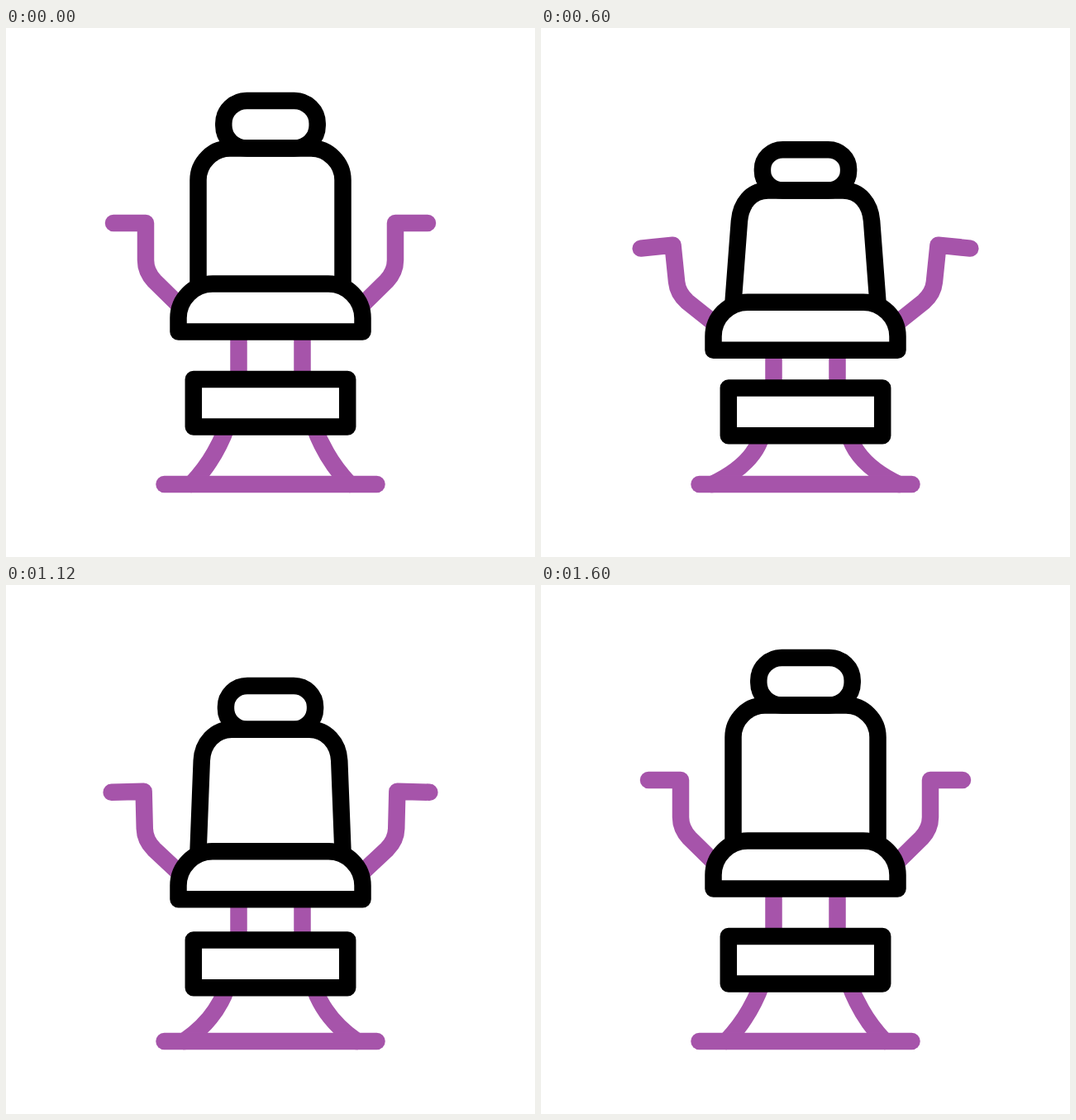
Animation of 640 by 640 pixels, one loop 1.8 s. Source, as an HTML page:

```html
<!DOCTYPE html>
<html lang="en">
<head>
<meta charset="utf-8">
<title>Barber chair</title>
<style>
  html, body { margin: 0; width: 100%; height: 100%; overflow: hidden; background: #fff; }
  svg { display: block; width: 100vw; height: 100vh; }
  svg * { stroke-width: 20.5; stroke-linecap: round; stroke-linejoin: round; }
  .accent { stroke: #a654aa; fill: none; }
  .body { stroke: #000; fill: #fff; }
</style>
</head>
<body>
<svg viewBox="0 0 640 640">
  <g class="accent">
    <g id="half">
      <path id="arm" d="M130 236H169V281C169 291 173 299 179.5 306L209 335"/>
      <path id="pole"/>
      <path id="leg"/>
    </g>
    <use href="#half" transform="matrix(-1 0 0 1 640 0)"/>
    <path d="M191.5 552H448.5"/>
  </g>
  <g class="body">
    <rect id="head"/>
    <path id="back" fill="none"/>
    <path id="seat" d="M208.5 367.5V351A41.5 41.5 0 0 1 250 309.5H390A41.5 41.5 0 0 1 431.5 351V367.5Z"/>
    <rect id="box" x="226.8" y="425" width="186.4" height="57.6"/>
  </g>
</svg>
<script>
const LOOP = 1800, STEP = 40;
const SINK = [[160, 0], [765, 1], [840, 1], [1400, 0]];
const SWING = [[145, 0], [440, 12.4], [840, -6.2], [1260, 4.1], [1600, 0]];

const $ = id => document.getElementById(id);
const set = (id, attrs) => {
  for (const name in attrs) $(id).setAttribute(name, attrs[name]);
};

const smooth = u => u * u * (3 - 2 * u);

// cubic-bezier(.5, 0, .5, 1)
function strong(x) {
  let lo = 0, hi = 1;
  for (let i = 0; i < 24; i++) {
    const u = (lo + hi) / 2;
    if (1.5 * u * (1 - u) + u ** 3 < x) lo = u; else hi = u;
  }
  return smooth((lo + hi) / 2);
}

function track(keys, t, ease) {
  if (t <= keys[0][0]) return keys[0][1];
  for (let i = 1; i < keys.length; i++) {
    const [t0, a] = keys[i - 1], [t1, b] = keys[i];
    if (t < t1) return a + (b - a) * ease((t - t0) / (t1 - t0));
  }
  return keys[keys.length - 1][1];
}

function draw(t) {
  const p = track(SINK, t, strong);
  const q = p ** 1.5;
  const angle = track(SWING, t, smooth);
  const seatY = 25.5 * p, boxY = 13 * q;

  set('seat', { transform: `translate(0 ${seatY})` });
  set('box', { transform: `translate(0 ${boxY})` });
  set('arm', { transform: `translate(0 ${seatY}) rotate(${-angle} 207.5 331)` });
  set('pole', { d: `M281.5 ${367.5 + seatY}V${425 + boxY}` });
  set('leg', {
    d: `M267 ${483 + boxY}Q${252 + 5 * q} ${523 + 7 * q} ${224 - 10 * (p + q)} 552`
  });
  set('head', {
    x: 263.3 + 5.3 * p, y: 88 + 68 * p,
    width: 113.4 - 10.6 * p, height: 57.6 - 9.5 * p,
    rx: 28 - 4 * p, ry: 27.5 - 4.5 * p
  });

  const side = 232.5 + 8.5 * p, shoulder = 184 + 57 * p;
  const top = 145.6 + 58.5 * p, corner = 271 + 4.5 * p;
  const c1 = side + 2 * p, c2 = corner - 21;
  set('back', {
    d: `M232.5 ${310 + seatY}L${side} ${shoulder}` +
       `C${c1} ${shoulder - 21} ${c2} ${top} ${corner} ${top}H${640 - corner}` +
       `C${640 - c2} ${top} ${640 - c1} ${shoulder - 21} ${640 - side} ${shoulder}` +
       `L407.5 ${310 + seatY}`
  });
}

const start = performance.now();
function tick() {
  const t = (performance.now() - start) % LOOP;
  draw(Math.floor(t / STEP) * STEP);
  requestAnimationFrame(tick);
}
tick();
</script>
</body>
</html>
```
